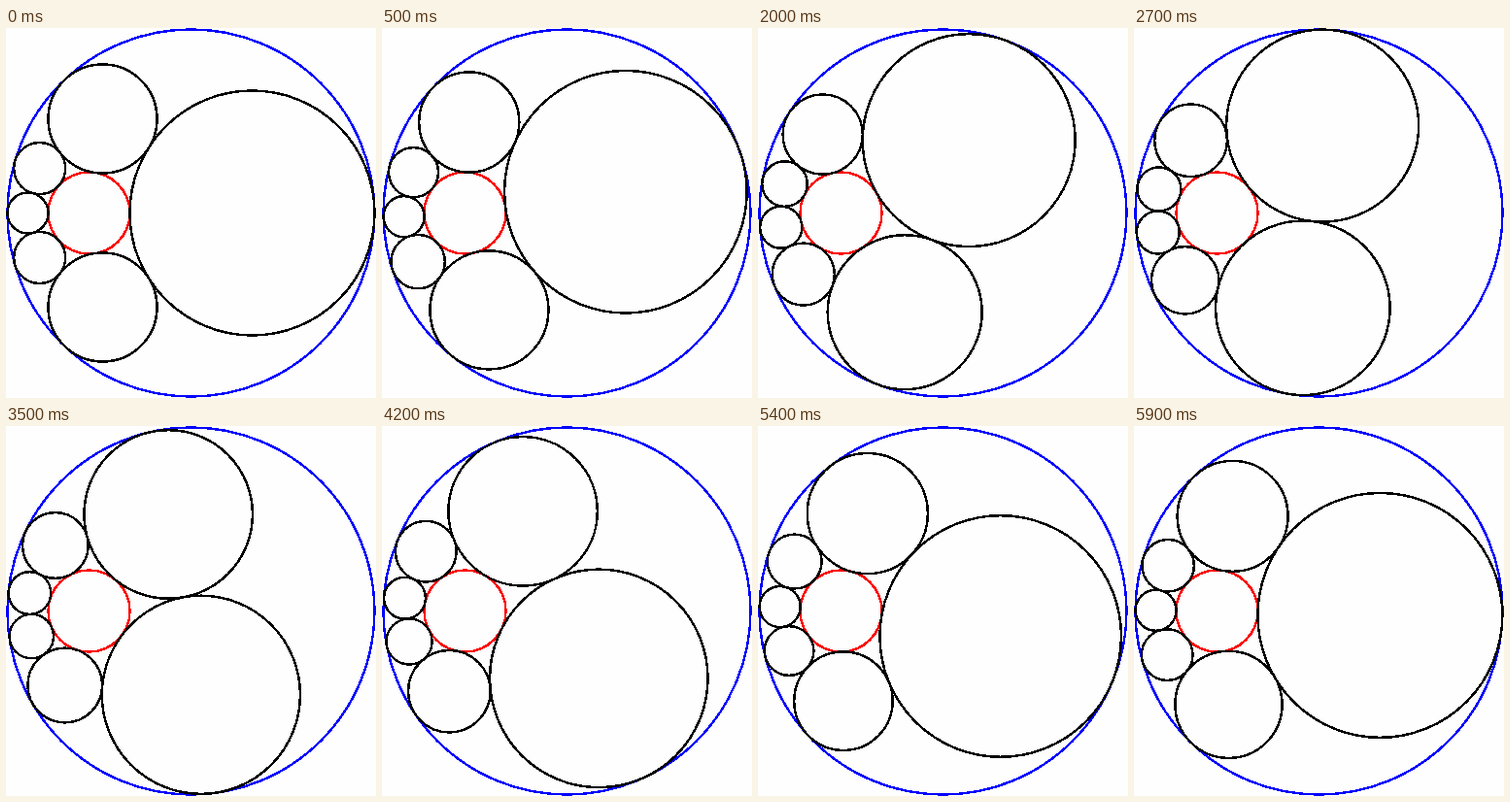
Write an HTML page that moves like this. It is 381 by 381 pixels and loops after 6000 ms.

```html
<!DOCTYPE html>
<html lang="en">
<head>
<meta charset="utf-8">
<title>Steiner chain</title>
<style>
  html, body { margin: 0; width: 100%; height: 100%; overflow: hidden; background: #fefefe; }
  svg { display: block; width: 100vw; height: 100vh; }
  circle { fill: none; stroke: #000; stroke-width: 2.5; shape-rendering: crispEdges; }
</style>
</head>
<body>
<svg id="stage" viewBox="0 0 381 381"></svg>
<script>
const LOOP = 6000, STEP = 100, COUNT = 6;
const UNIT = 21, LEFT = 1.5, MID = 190.5;
const stage = document.getElementById('stage');

function addCircle(color) {
  const c = document.createElementNS('http://www.w3.org/2000/svg', 'circle');
  c.style.stroke = color;
  stage.appendChild(c);
  return c;
}

function place(c, x, y, r) {
  c.setAttribute('cx', LEFT + UNIT * x);
  c.setAttribute('cy', MID - UNIT * y);
  c.setAttribute('r', UNIT * r);
}

place(addCircle('#00f'), 9, 0, 9);
place(addCircle('#f00'), 4, 0, 2);
const chain = Array.from({ length: COUNT }, () => addCircle('#000'));

// Unit circles at distance 2 from the origin, mapped by z -> 48 / (5 - z) - 6.
function draw(time) {
  const degrees = Math.floor((time % LOOP) / STEP);
  chain.forEach((c, i) => {
    const a = (degrees + i * 360 / COUNT) * Math.PI / 180;
    const r = 48 / (28 - 20 * Math.cos(a));
    place(c, r * (5 - 2 * Math.cos(a)) - 6, r * 2 * Math.sin(a), r);
  });
}

let start;
function tick(now) {
  start ??= now;
  draw(now - start);
  requestAnimationFrame(tick);
}
draw(0);
requestAnimationFrame(tick);
</script>
</body>
</html>
```
